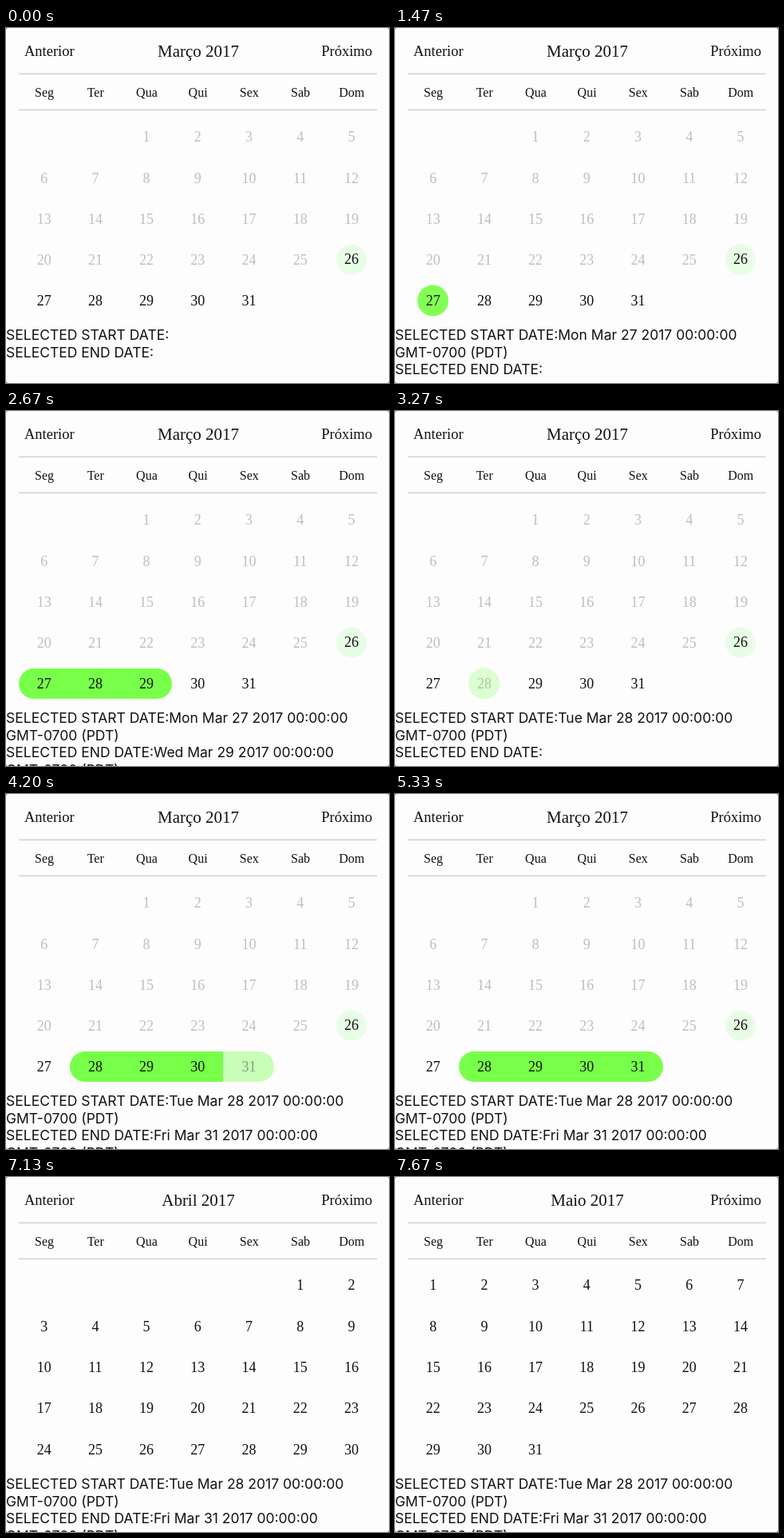
Animation of 480 by 444 pixels, one loop 8000 ms. Source, as an HTML page with a canvas:

```html
<!DOCTYPE html>
<html lang="pt">
<head>
<meta charset="utf-8">
<title>Calendário</title>
<style>
  html, body { margin: 0; width: 100%; height: 100%; overflow: hidden; background: #808080; }
  canvas { display: block; }
</style>
</head>
<body>
<canvas id="stage" width="480" height="444"></canvas>
<script>
const LOOP = 8000;
const SERIF = '"Liberation Serif", serif';
const SANS = 'Inter, sans-serif';
const INK = '#111', MUTED = '#bebec0', RULE = '#d6d6d6', PAPER = '#fdfdfd';
const GREEN = '#78ff4a', TODAY_GREEN = '#e8fde5';
const WEEKDAYS = ['Seg', 'Ter', 'Qua', 'Qui', 'Sex', 'Sab', 'Dom'];
const TODAY = 26;

const MONTHS = [
  { from: 0, name: 'Março 2017', offset: 2, days: 31, current: true },
  { from: 6900, name: 'Abril 2017', offset: 5, days: 30 },
  { from: 7465, name: 'Maio 2017', offset: 0, days: 31 },
];
const SELECTIONS = [
  { from: 0 },
  { from: 1325, start: 27 },
  { from: 2200, start: 27, end: 29 },
  { from: 3200, start: 28 },
  { from: 4130, start: 28, end: 31 },
];
// A touched item dims while held, then fades back after release.
const TOUCHES = [
  { item: 27, down: 1065, up: 1290, fadeOut: 1, fadeIn: 230 },
  { item: 29, down: 1865, up: 2230 },
  { item: 28, down: 3065, up: 3230 },
  { item: 31, down: 3925, up: 4115 },
  { item: 'next', down: 6590, up: 6845 },
  { item: 'next', down: 7464, up: 7465, fadeOut: 1, fadeIn: 200 },
];

const ctx = document.getElementById('stage').getContext('2d');
const columnX = col => 48 + 64.2 * col;
const clamp = v => Math.min(1, Math.max(0, v));
const easeInOut = v => v < 0.5 ? 2 * v * v : 1 - 2 * (1 - v) ** 2;
const latest = (list, t) => list.filter(entry => entry.from <= t).pop();

function opacity(item, t) {
  const touch = TOUCHES.filter(x => x.item === item && x.down <= t).pop();
  if (!touch) return 1;
  const { down, up, fadeOut = 150, fadeIn = 250 } = touch;
  return t < up
    ? 1 - 0.8 * easeInOut(clamp((t - down) / fadeOut))
    : 0.2 + 0.8 * easeInOut(clamp((t - up) / fadeIn));
}

function text(str, x, y, size, { color = INK, align = 'center', family = SERIF } = {}) {
  ctx.font = `${size}px ${family}`;
  ctx.fillStyle = color;
  ctx.textAlign = align;
  ctx.fillText(str, x, y);
}

function box(x, y, w, h, radii, color) {
  ctx.fillStyle = color;
  ctx.beginPath();
  ctx.roundRect(x, y, w, h, radii);
  ctx.fill();
}

function drawHeader(month, t) {
  text('Anterior', 23, 35, 18.5, { align: 'left' });
  text(month.name, 241, 36, 21);
  ctx.globalAlpha = opacity('next', t);
  text('Próximo', 459, 35, 18.5, { align: 'right' });
  ctx.globalAlpha = 1;
  for (const y of [56.5, 101.5]) box(16, y, 449, 1.8, 0, RULE);
  WEEKDAYS.forEach((name, col) => text(name, columnX(col), 86, 16));
}

function drawHighlight(day, col, y, { start, end }) {
  const x = columnX(col);
  if (day === start && !end) {
    box(x - 20, y - 19.5, 39, 39, 19.5, GREEN);
  } else if (end && day >= start && day <= end) {
    const left = day === start ? 19 : 0, right = day === end ? 19 : 0;
    box(16 + 64 * col, y - 19, 64, 38, [left, right, right, left], GREEN);
  } else if (day === TODAY) {
    box(x - 19.2, y - 19, 38, 38, 19, TODAY_GREEN);
  }
}

function drawDays(month, selection, t) {
  for (let day = 1; day <= month.days; day++) {
    const cell = day - 1 + month.offset;
    const col = cell % 7;
    const y = 135.2 + 51.4 * Math.floor(cell / 7);
    const disabled = month.current && day < TODAY;
    if (month.current) {
      ctx.globalAlpha = opacity(day, t);
      drawHighlight(day, col, y + 0.2, selection);
    }
    text(day, columnX(col) - 0.3, y + (disabled ? 7 : 6), 18, { color: disabled ? MUTED : INK });
    ctx.globalAlpha = 1;
  }
}

function dateLines(day) {
  if (!day) return [''];
  const weekday = ['Mon', 'Tue', 'Wed', 'Thu', 'Fri'][day - 27];
  return [`${weekday} Mar ${day} 2017 00:00:00`, 'GMT-0700 (PDT)'];
}

function drawSummary({ start, end }) {
  const [first, ...rest] = dateLines(start);
  const [last, ...tail] = dateLines(end);
  const lines = ['SELECTED START DATE:' + first, ...rest, 'SELECTED END DATE:' + last, ...tail];
  lines.forEach((line, i) =>
    text(line, 0, 390 + 21.5 * i, 17.5, { align: 'left', family: SANS }));
}

function draw(now) {
  const t = now % LOOP;
  const month = latest(MONTHS, t), selection = latest(SELECTIONS, t);
  ctx.clearRect(0, 0, 480, 444);
  box(0, 0, 480, 444, 3, PAPER);
  drawHeader(month, t);
  drawDays(month, selection, t);
  drawSummary(selection);
  requestAnimationFrame(draw);
}
requestAnimationFrame(draw);
</script>
</body>
</html>
```
